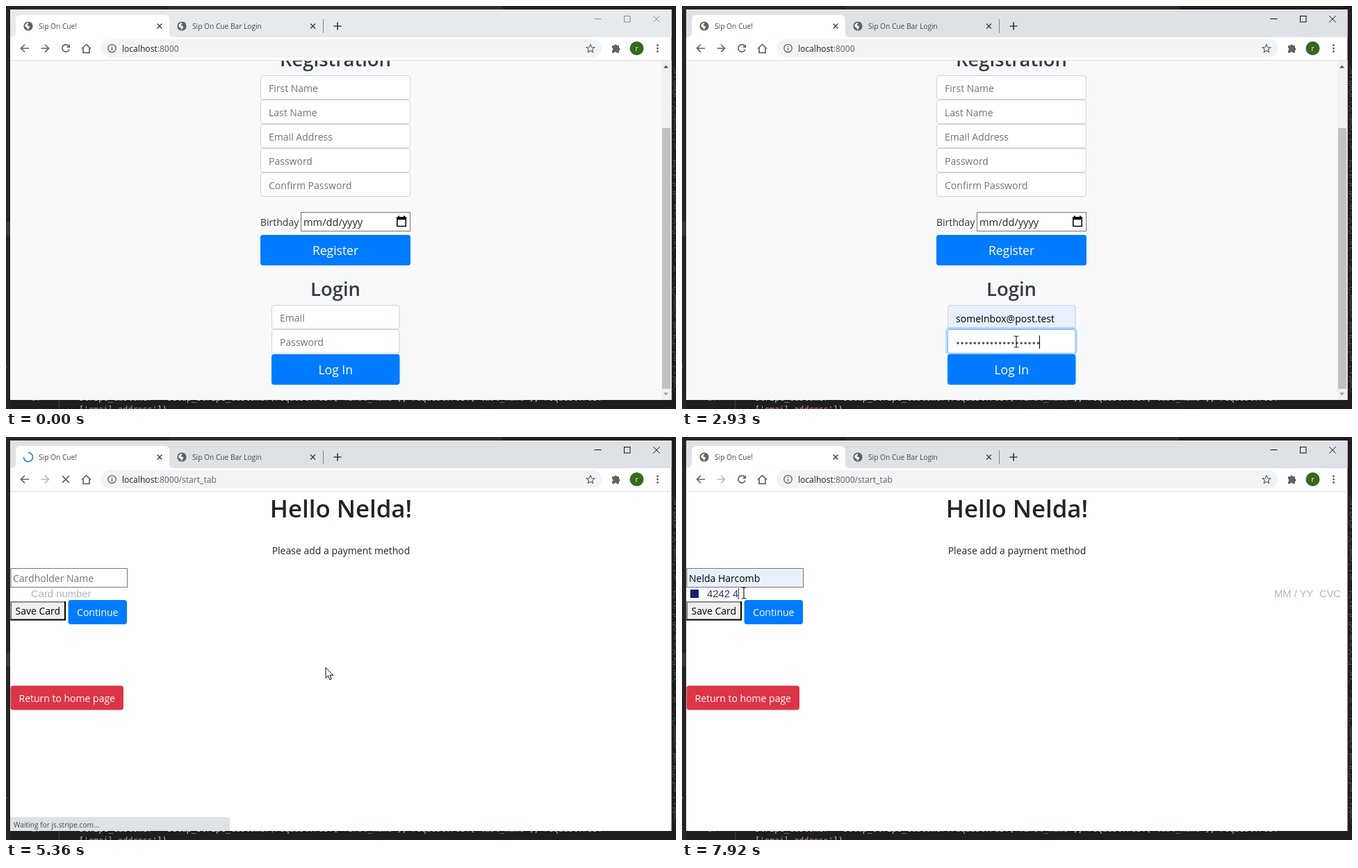
Animation of 964x581 px, one loop 8 s. Source, as an HTML page:

```html
<!DOCTYPE html>
<html lang="en">
<head>
<meta charset="utf-8">
<title>Tab payment demo</title>
<style>
html, body { margin: 0; width: 100%; height: 100%; overflow: hidden; background: #1e1e1e; }
svg { display: block; width: 100vw; height: 100vh; }
text { font: 14px "Open Sans", "Noto Sans", sans-serif; fill: #212529; white-space: pre; }
.soft text { fill: #343a40; }
text.mid { text-anchor: middle; }
text.head { font-weight: 600; }
text.ui { font-size: 10.2px; fill: #45494d; }
.soft text.hint, text.hint { fill: #6c757d; }
text.row { font-size: 10.9px; font-weight: 600; fill: #202124; }
text.card { font: 14.8px "Liberation Sans", Arial, sans-serif; fill: #aab7c4; }
text.code { font: 11.7px "DejaVu Sans Mono", monospace; fill: #c8c8c8; }
.line { fill: none; stroke: #5f6368; stroke-width: 1.7; }
.pop { fill: #fff; filter: drop-shadow(0 1px 2px rgba(0, 0, 0, .35)); }
</style>
</head>
<body>
<svg id="stage" viewBox="0 0 964 581"></svg>
<script>
const LOOP = 8000;
const APP = 'Sip On Cue', GUEST = 'Nelda', FULL_NAME = 'Nelda Harcomb';
const EMAILS = ['nora@pho.test', 'colin@mock.test', 'inbox@post.test', 'someInbox@post.test'];
const EMAIL = EMAILS[3];
const BLUE = '#007bff', BLUE_HOVER = '#0069d9', AUTOFILL = '#e8f0fe';

// Moments of the story in ms
const ACTIVE = 1040, EMAIL_FOCUS = 1140, LIST = 1230, PICK = 1760, PASS_FOCUS = 2200, PASS = 2930;
const SUBMIT = 3280, HOME = 3630, HOME_DONE = 3800, START = 5060, PAY = 5160, CARD_READY = 5620, PAY_DONE = 5700;
const NAME_FOCUS = 6370, NAME_LIST = 6460, NAME_HOVER = 6550, NAME_PICK = 6690, CARD_FOCUS = 7010;
const TYPED = '4242 4', KEYS = [7420, 7500, 7580, 7770, 7850, 7920];

// Cursor poses: time, x, y, shape
const POSES = [
  [80, 808, 338, 'arrow'], [170, 802, 322, 'arrow'], [530, 802, 365, 'arrow'], [620, 800, 402, 'arrow'],
  [770, 730, 416, 'arrow'], [860, 610, 438, 'arrow'], [950, 520, 450, 'beam'], [1040, 505, 447, 'beam'],
  [1480, 504, 425, 'arrow'], [1540, 503, 402, 'arrow'], [1850, 500, 410, 'arrow'], [1950, 494, 446, 'beam'],
  [2040, 484, 476, 'beam'], [2120, 481, 484, 'beam'], [3100, 480, 494, 'beam'], [3190, 477, 515, 'hand'],
  [HOME, 477, 515, 'arrow'], [4590, 400, 460, 'arrow'], [4680, 240, 360, 'arrow'], [4770, 110, 285, 'arrow'],
  [4860, 62, 251, 'hand'], [5060, 90, 262, 'hand'], [5160, 240, 290, 'arrow'], [5260, 380, 318, 'arrow'],
  [5360, 460, 332, 'arrow'], [5460, 520, 362, 'arrow'], [5540, 548, 382, 'arrow'], [5620, 557, 387, 'arrow'],
  [5850, 500, 350, 'arrow'], [5940, 380, 285, 'arrow'], [6030, 240, 215, 'arrow'], [6110, 140, 170, 'arrow'],
  [6200, 95, 203, 'beam'], [6460, 98, 222, 'arrow'], [6550, 101, 246, 'arrow'], [6690, 101, 257, 'hand'],
  [6850, 95, 238, 'hand'], [6930, 89, 225, 'beam']
];

const rect = (x, y, w, h, fill, extra = '') =>
  `<rect x="${x}" y="${y}" width="${w}" height="${h}" fill="${fill}" ${extra}/>`;
const text = (x, y, str, cls = '', style = '') => `<text x="${x}" y="${y}" class="${cls}" style="${style}">${str}</text>`;
const path = (d, extra = 'class="line"') => `<path d="${d}" ${extra}/>`;
const at = (spans, ...parts) => `<g data-t="${spans}">${parts.join('')}</g>`;
const soft = (...parts) => `<g class="soft">${parts.join('')}</g>`;
const box = (x, y, w, fill = '#fff', stroke = '#ced4da') =>
  rect(x + .5, y + .5, w - 1, 34, fill, `rx="3.5" stroke="${stroke}"`);
const glow = (y, fill = '#fff') =>
  rect(380.5, y - 1.5, 187, 38, 'none', 'rx="5" stroke="#007bff" stroke-opacity=".25" stroke-width="3"') +
  box(382, y, 184.5, fill, '#80bdff');
const field = (x, y, w, label) => box(x, y, w) + text(x + 12, y + 24, label, 'hint');
const button = (x, y, w, h, fill, label, size = 14) =>
  rect(x, y, w, h, fill, 'rx="3.7"') +
  text(x + w / 2, y + h / 2 + size * .36 + .5, label, 'mid', `fill:#fff;font-size:${size}px`);
const caret = (x, y) => rect(x, y, 1, 19, '#000');

function desktop() {
  let seed = 7;
  const random = () => (seed = seed * 16807 % 2147483647) / 2147483647;
  let out = rect(0, 0, 964, 581, '#1e1e1e') + rect(0, 0, 235, 6, '#252526') + rect(235, 0, 480, 6, '#2d2d2d') +
    rect(0, 6, 7, 575, '#252526') + rect(0, 311, 7, 20, '#37373d') +
    text(-5, 528, '/', 'code', 'fill:#d19a4a') + rect(76, 568, 1, 13, '#404040');
  for (let y = 84; y < 560; y += 3)
    if (random() > .3) out += rect(959 + random() * 3, y, 1 + random() * 4, 1.4, '#777', 'opacity=".6"');
  const str = s => `<tspan fill="#ce9178">${s}</tspan>`;
  return out + text(37, 569, '37', 'code', 'fill:#858585') +
    text(105, 569, `stripe_customer = setup_stripe_customer(request.POST[${str("'first_name'")}], request.POST[${str("'last_name'")}], request.POST`, 'code') +
    text(105, 586, `[${str("'email_address'")}])`, 'code');
}

const globe = x => `<circle cx="${x}" cy="29" r="6.6" fill="#5f6368"/>` +
  path(`M${x - 4.8} 27.5q3-4 5-3.2q.5 2-1.6 2.6q-.2 1.6 1.8 1.8q2.4.2 1.4 2.2q-1.4.6-1.4 3q-2 .2-2-2.4q-2.8-.6-3.2-4z`, 'fill="#fff"');
const cross = (x, y, r, extra) => path(`M${x - r} ${y - r}l${2 * r} ${2 * r}m0 ${-2 * r}l${-2 * r} ${2 * r}`, extra);
const thin = color => `fill="none" stroke="${color}" stroke-width="1"`;
const windowButtons = color => path('M846.5 18.5h10', thin(color)) +
  rect(889.5, 14.5, 8.5, 8.5, 'none', `stroke="${color}"`) + cross(936, 18.8, 4.7, thin(color));

function browser() {
  const idle = `0-${SUBMIT} ${HOME_DONE}-${START} ${PAY_DONE}-${LOOP}`;
  const busy = `${SUBMIT}-${HOME_DONE} ${START}-${PAY_DONE}`;
  const forward = 'M50.5 61h11m-5.5-5.5l5.5 5.5l-5.5 5.5';
  const tabCross = x => cross(x, 29, 3.4, 'fill="none" stroke="#3c4043" stroke-width="1.4"');
  const url = rest => text(167, 65.5, `localhost<tspan fill="#5f6368">${rest}</tspan>`, '', 'font-size:12.1px');
  return rect(6, 5, 951.5, 563, '#fff') +
    at(`0-${ACTIVE}`, rect(6, 5, 951.5, 40, '#e7eaed'), windowButtons('#8b8e92')) +
    at(`${ACTIVE}-${LOOP}`, rect(6, 5, 951.5, 40, '#dee1e6'), windowButtons('#111')) +
    path('M7 45q7 0 7-7V20q0-7 7-7H228q7 0 7 7V38q0 7 7 7z', 'fill="#fff"') +
    at(idle, globe(32)) +
    at(busy, '<circle id="spinner" cx="32" cy="29" r="6.5" fill="none" stroke="#4285d8" stroke-width="1.8" stroke-dasharray="30 12"/>') +
    at(`0-${HOME} ${PAY}-${LOOP}`, text(47, 32.5, APP + '!', 'ui')) +
    at(`${HOME}-${PAY}`, text(47, 32.5, APP + ' Homepage', 'ui')) +
    globe(253) + text(268, 32.5, APP + ' Bar Login', 'ui') +
    tabCross(221) + tabCross(441.5) +
    rect(456, 19, 1, 20, '#80868b') + path('M471.5 29h11m-5.5-5.5v11', 'class="line" style="stroke:#3c4043"') +
    path('M33 61H21.5m5.5-5.5l-5.5 5.5l5.5 5.5') +
    at(`0-${HOME}`, path(forward)) + at(`${HOME}-${LOOP}`, path(forward, 'class="line" style="stroke:#b8babd"')) +
    at(idle, path('M90 57.5a5.2 5.2 0 1 0 1 5'), path('M92 55v5h-5z', 'fill="#5f6368"')) +
    at(busy, cross(86, 61, 4.8)) +
    path('M109 61.5l6.5-6l6.5 6M111 60v7.3h9V60') +
    rect(136, 48, 721, 26, '#f1f3f4', 'rx="13"') +
    '<circle cx="152.5" cy="61" r="5.7" class="line" style="stroke-width:1.3"/>' +
    rect(151.8, 60.3, 1.4, 4, '#5f6368') + rect(151.8, 57.7, 1.4, 1.5, '#5f6368') +
    at(`0-${PAY}`, url(':8000')) + at(`${PAY}-${LOOP}`, url(':8000/start_tab')) +
    path('M841 55.5l1.7 3.8l4.1.4l-3.1 2.7l.9 4.1l-3.6-2.1l-3.6 2.1l.9-4.1l-3.1-2.7l4.1-.4z', 'class="line" style="stroke-width:1.2"') +
    path('M872 57h3.2a1.9 1.9 0 0 1 3.7 0H882v3.3a1.9 1.9 0 0 1 0 3.7V67.5h-3.3a1.8 1.8 0 0 0-3.5 0H872V64a1.8 1.8 0 0 0 0-3.5z', 'fill="#5f6368"') +
    '<circle cx="907.5" cy="61" r="10" fill="#33691e"/>' + text(907.5, 64.5, 'r', 'mid', 'fill:#fff;font-size:10px') +
    [56.5, 61, 65.5].map(y => `<circle cx="937.5" cy="${y}" r="1.5" fill="#5f6368"/>`).join('') +
    rect(6, 78, 951.5, 1, '#dadcdf');
}

const pageBackground = rect(6, 79, 937, 489, '#f8f9fb');
const scrollbar = (y, h, up, down) => rect(943, 79, 14.5, 489, '#f1f1f1') + rect(944, y, 12, h, '#c1c1c1') +
  path('M946 89.5l3.5-4l3.5 4z', `fill="${up}"`) + path('M946 557.5l3.5 4l3.5-4z', `fill="${down}"`);

function loginPage() {
  const labels = ['First Name', 'Last Name', 'Email Address', 'Password', 'Confirm Password'];
  const dots = Array.from({ length: 20 }, (_, i) => `<circle cx="${397 + i * 6.07}" cy="486" r="1.75" fill="#495057"/>`).join('');
  const filled = text(394, 455.5, EMAIL, '', 'fill:#000');
  const logIn = fill => button(382, 502, 184.5, 44, fill, 'Log In', 17.5);
  return at(`0-${HOME}`,
    pageBackground,
    soft(`<g clip-path="url(#page)">${text(474, 87, 'Registration', 'head mid', 'font-size:27.4px')}</g>`,
      ...labels.map((label, i) => field(366, 100 + 35 * i, 216, label)),
      text(366, 317, 'Birthday')),
    rect(424.5, 297.5, 157, 27, '#fff', 'stroke="#767676"'),
    text(428, 317, 'mm/dd/yyyy', '', 'font-size:14.6px'),
    rect(562.8, 305, 12.5, 12.5, 'none', 'stroke="#000" stroke-width="1.5"'),
    rect(562, 304, 14, 4, '#000'), rect(564, 302.5, 2, 2, '#000'), rect(572, 302.5, 2, 2, '#000'),
    button(366, 330, 216, 44, BLUE, 'Register', 17.5),
    soft(text(474, 418, 'Login', 'head mid', 'font-size:27.4px'),
      field(382, 431, 184.5, 'Email'), field(382, 466, 184.5, 'Password')),
    logIn(BLUE), at(`3190-${HOME}`, logIn(BLUE_HOVER)),
    at(`${EMAIL_FOCUS}-1540`, glow(431), text(394, 455.5, 'Email', 'hint')),
    at(`1540-${PASS_FOCUS}`, glow(431, AUTOFILL), filled),
    at(`${PASS_FOCUS}-${HOME}`, box(382, 431, 184.5, AUTOFILL), filled, glow(466)),
    at(`${PASS_FOCUS}-${PASS}`, text(394, 490.5, 'Password', 'hint')),
    at(`${PASS_FOCUS}-2560 2750-${PASS}`, caret(394, 475)),
    at(`${PASS}-${HOME}`, dots), at(`${PASS}-${SUBMIT}`, caret(514, 475)),
    at(`${LIST}-${PICK}`,
      rect(382, 282.5, 184.5, 149, '#fff', 'class="pop" rx="2"'),
      at(`1540-${PICK}`, rect(382, 390, 184.5, 33, '#e8e8e9')),
      ...EMAILS.map((mail, i) => text(393, 311 + 33.3 * i, mail, 'row'))),
    scrollbar(176, 376, '#505050', '#a3a3a3'));
}

function homePage() {
  const startTab = fill => button(21, 241, 93, 35, fill, 'Start a Tab');
  return at(`${HOME}-${PAY}`,
    pageBackground,
    soft(text(474, 130, `Welcome ${GUEST}!`, 'head mid', 'font-size:34.8px'),
      text(474, 184, 'Thank you for coming to the Kelp Bar!', 'mid'),
      text(474, 221, 'Click Below to start a tab and your server will be right over.', 'mid'),
      text(21, 339, 'Order History:', 'head', 'font-size:17.4px'),
      ...[7, 8, 9].map((n, i) => text(21, 367 + 37 * i, 'Tab #' + n))),
    startTab('#28a745'), at(`4860-${PAY}`, startTab('#218838')),
    button(21, 461, 78, 35, '#6c757d', 'Account'),
    button(21, 518, 70.5, 35, '#6c757d', 'Logout'),
    scrollbar(94, 452, '#a3a3a3', '#505050'));
}

const status = (w, str) => path(`M6 548H${w - 3}q3 0 3 3V568H6z`, 'fill="#dee1e6"') + text(11, 562.5, str, 'ui');

function payPage() {
  const nameBox = (fill, focused) => focused
    ? rect(7, 190, 167, 27, fill, 'rx="2" stroke="#101010" stroke-width="2"')
    : rect(7, 189.5, 167.5, 27, fill, 'stroke="#767676"');
  const name = text(10, 209, FULL_NAME, '', 'fill:#000');
  const nameHint = text(10, 209, 'Cardholder Name', '', 'fill:#757575');
  const next = fill => button(89.5, 235, 84.5, 35, fill, 'Continue');
  return at(`${PAY}-${LOOP}`,
    text(482, 115.5, `Hello ${GUEST}!`, 'head mid', 'font-size:34.8px'),
    text(482, 169, 'Please add a payment method', 'mid'),
    at(`${PAY}-${NAME_FOCUS}`, nameBox('#fff'), nameHint),
    at(`${NAME_FOCUS}-${NAME_HOVER}`, nameBox('#fff', true), nameHint, caret(10, 194)),
    at(`${NAME_HOVER}-${CARD_FOCUS}`, nameBox(AUTOFILL, true), name),
    at(`${NAME_PICK}-${CARD_FOCUS}`, caret(105, 194)),
    at(`${CARD_FOCUS}-${LOOP}`, nameBox(AUTOFILL), name),
    at(`${CARD_READY}-${KEYS[0]}`, rect(7.5, 220, 19.5, 12.5, '#d5dbe1', 'rx="1.5"'),
      path('M9.5 228.5h7m2 0h5', 'stroke="#fff" stroke-width="1.5" stroke-dasharray="2 1"')),
    at(`${KEYS[0]}-${LOOP}`, rect(12, 220, 12, 12, '#1a1f71')),
    at(`${PAY}-${KEYS[0]}`, text(36, 231, 'Card number', 'card')),
    at(`${CARD_READY}-${LOOP}`, text(852, 231, 'MM / YY', 'card'), text(917, 231, 'CVC', 'card')),
    '<text id="digits" x="36" y="231" class="card" style="fill:#32325d"></text>',
    at(`${CARD_FOCUS}-7180 ${KEYS[0]}-${LOOP}`, '<rect id="cardCaret" y="218" width="1" height="16" fill="#32325d"/>'),
    rect(6.5, 237, 79.5, 27.5, '#efefef'),
    path('M7.3 264V237.8H85', 'fill="none" stroke="#6a6a6a" stroke-width="1.6"'),
    path('M6.5 263.5H85V237', 'fill="none" stroke="#000" stroke-width="2"'),
    text(13.5, 256, 'Save Card', '', 'fill:#000'),
    next(BLUE), at(`${NAME_PICK}-6930`, next(BLUE_HOVER)),
    button(6.5, 358.5, 162.5, 35, '#dc3545', 'Return to home page'),
    at(`${PAY}-5540`, status(322, 'Waiting for js.stripe.com...')),
    at('6780-6930', status(185, 'localhost:8000/order')),
    at(`${NAME_LIST}-${NAME_PICK}`,
      rect(7.5, 217.5, 175, 53, '#fff', 'class="pop" rx="2"'),
      at(`${NAME_HOVER}-${NAME_PICK}`, rect(7.5, 227.5, 175, 33, '#e8e8e9')),
      text(18, 248, FULL_NAME, 'row')),
    at(`${KEYS[1]}-${KEYS[4]}`,
      rect(36, 236, 420, 42, '#fff', 'class="pop" rx="2"'),
      text(47, 261, 'Payment autofill is off because this connection is not secure.', 'row')));
}

const outline = 'fill="#fff" stroke="#000" stroke-linejoin="round"';
const cursor = `<g id="cursor">
  <path data-shape="arrow" d="M0 .5V15.5L3.5 12.3L5.9 17.8L8.3 16.7L5.9 11.4H10.7Z" ${outline}/>
  <path data-shape="hand" d="M-1.8 1.5Q0-1 1.8 1.5V6.5L7.5 8Q9 8.5 9 11L7.8 16.5V19.5H-.5V17L-5 11.5Q-4.5 8.5-1.8 11.2Z" ${outline}/>
  <path data-shape="beam" d="M-3.5-8H-1L0-7L1-8H3.5M0-7V7M-3.5 8H-1L0 7L1 8H3.5" fill="none" stroke="#222" stroke-width="1.2"/>
</g>`;

const stage = document.getElementById('stage');
stage.innerHTML = '<clipPath id="page"><rect x="6" y="79" width="937" height="489"/></clipPath>' +
  desktop() + browser() + loginPage() + homePage() + payPage() + cursor;

const get = id => document.getElementById(id);
const timed = [...stage.querySelectorAll('[data-t]')].map(node => ({
  node, spans: node.dataset.t.split(' ').map(span => span.split('-').map(Number))
}));
const shapes = [...stage.querySelectorAll('[data-shape]')];
const show = (node, on) => { node.style.display = on ? '' : 'none'; };

function draw(t) {
  for (const { node, spans } of timed) show(node, spans.some(([from, to]) => t >= from && t < to));

  const pose = POSES.filter(p => p[0] <= t).pop();
  show(get('cursor'), pose);
  if (pose) {
    get('cursor').setAttribute('transform', `translate(${pose[1]} ${pose[2]})`);
    shapes.forEach(shape => show(shape, shape.dataset.shape === pose[3]));
  }

  const typed = TYPED.slice(0, KEYS.filter(key => key <= t).length);
  get('digits').textContent = typed;
  const advance = [...typed].reduce((sum, c) => sum + (c === ' ' ? 4.1 : 8.23), 0);
  get('cardCaret').setAttribute('x', Math.round(36 + advance));
  get('spinner').setAttribute('transform', `rotate(${(t - 5360) * .4 - 90} 32 29)`);
}

const start = performance.now();
function tick() {
  draw((performance.now() - start) % LOOP);
  requestAnimationFrame(tick);
}
tick();
</script>
</body>
</html>
```
